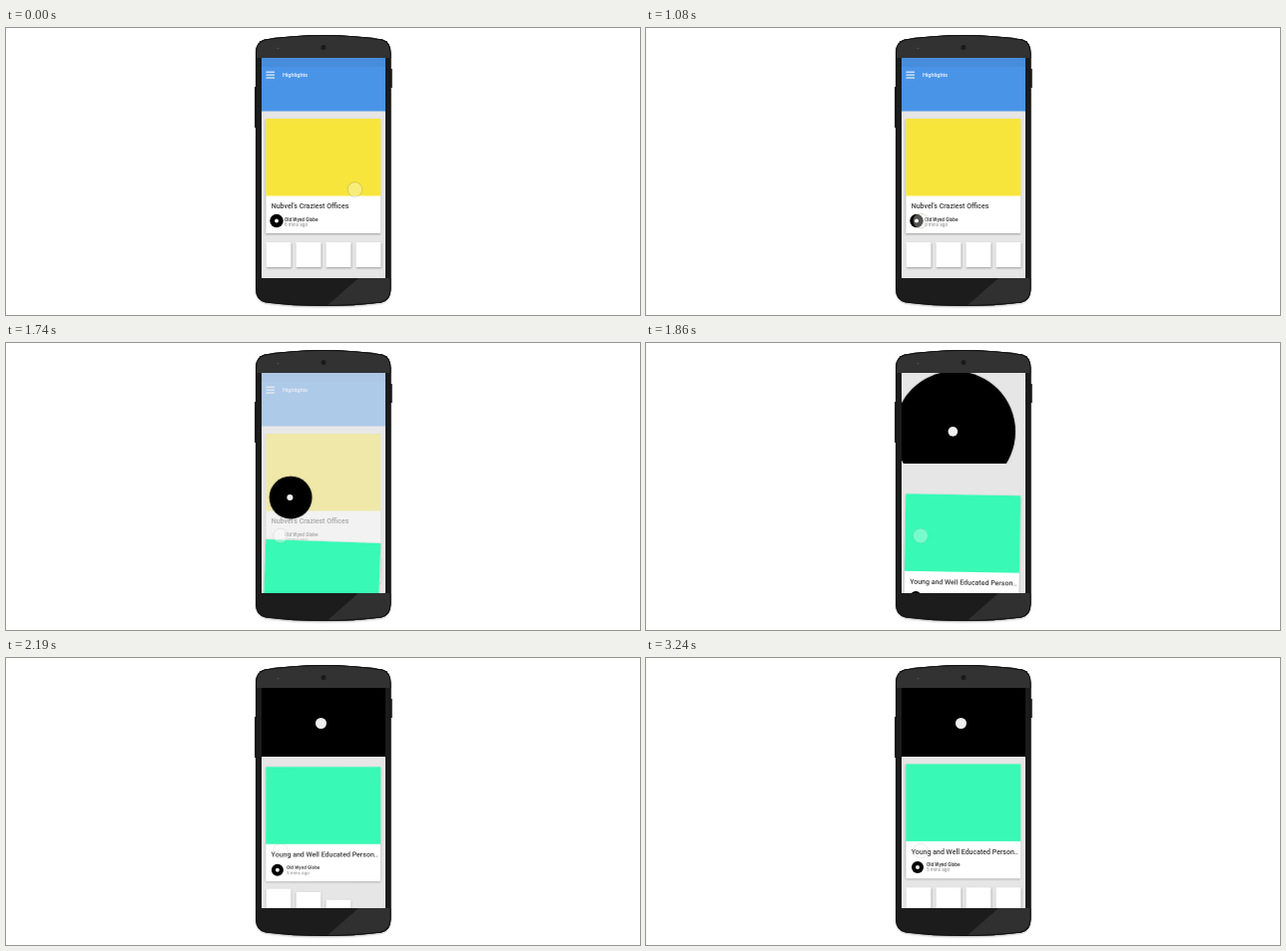
An HTML page with a canvas that plays this animation: 635x288 px, repeating every 3.39 s.

```html
<!DOCTYPE html>
<html lang="en">
<head>
<meta charset="utf-8">
<title>Card transition</title>
<style>
  html, body { margin: 0; width: 100%; height: 100%; overflow: hidden; background: #fff; }
  canvas { display: block; width: 635px; height: 288px; }
</style>
</head>
<body>
<canvas id="stage"></canvas>
<script>
const W = 635, H = 288, LOOP = 3390, STEP = 30;
const OPEN = 1620, FLIGHT = 330;
const GREY = '#e6e6e6', BLUE = '#4a94e7', YELLOW = '#f7e53c', GREEN = '#38f9b6';
const SCREEN = [256, 30, 124, 221];

const canvas = document.getElementById('stage');
const ctx = canvas.getContext('2d');
const dpr = window.devicePixelRatio || 1;
canvas.width = W * dpr;
canvas.height = H * dpr;

const clamp = v => Math.min(1, Math.max(0, v));
const span = (t, from, length) => clamp((t - from) / length);
const mix = (a, b, k) => a + (b - a) * k;
const smooth = k => k * k * (3 - 2 * k);

// Remaining share of the upward slide: 1 at the start, settling to 0
const slide = t => Math.exp(-Math.pow(Math.max(0, t - OPEN) / 225, 1.46));

function rect(x, y, w, h, fill) {
  ctx.fillStyle = fill;
  ctx.fillRect(x, y, w, h);
}

function disc(x, y, r, fill) {
  ctx.beginPath();
  ctx.arc(x, y, r, 0, Math.PI * 2);
  ctx.fillStyle = fill;
  ctx.fill();
}

function label(str, x, y, size, fill, weight = 500) {
  ctx.font = `${weight} ${size}px Roboto, sans-serif`;
  ctx.fillStyle = fill;
  ctx.fillText(str, x, y);
}

function shadow(alpha, blur, drop) {
  ctx.shadowColor = `rgba(0,0,0,${alpha})`;
  ctx.shadowBlur = blur * dpr;
  ctx.shadowOffsetY = drop * dpr;
}

function paper(x, y, w, h) {
  ctx.save();
  shadow(.32, 2, .7);
  rect(x, y, w, h, '#fff');
  ctx.restore();
}

function tile(i, y) {
  paper(260.5 + 30 * i, y, 25, 25);
}

function avatar(x, y, r) {
  disc(x, y, r, '#000');
  disc(x, y, 2, '#eee');
}

function card(y, color, title, age, textX) {
  paper(260.3, y, 115, 115);
  rect(260.3, y, 115, 77.5, color);
  label(title, 265.7, y + 90.2, 7, '#3a3a3a');
  label('Old Wynd Globe', textX, y + 102.6, 4.7, '#444', 700);
  label(age + ' mins ago', textX, y + 108, 4.7, '#8a8a8a', 400);
}

function highlights(t) {
  rect(256, 30, 124, 53.5, BLUE);
  rect(256, 30, 124, 9, '#488ddc');
  for (let i = 0; i < 3; i++) rect(260.5, 43.6 + 2.9 * i, 8.5, 1.2, '#e9f2fc');
  label('Highlights', 277, 49, 5.5, '#f4f9ff');
  card(91, YELLOW, "Nubvel's Craziest Offices", 6, 279);
  if (t < OPEN) avatar(271, 193.5, 6.7);
  for (let i = 0; i < 4; i++) tile(i, 215);
}

function tilted(deg, y, paint) {
  ctx.save();
  ctx.translate(262, y);
  ctx.rotate(deg * Math.PI / 180);
  ctx.translate(-262, -y);
  paint();
  ctx.restore();
}

function article(t) {
  for (let i = 0; i < 4; i++) {
    const rest = slide(t - 120 * i), y = 230.2 + 68 * rest;
    tilted(3 * rest, y, () => tile(i, y));
  }
  const rest = slide(t), y = 106.4 + 135 * rest;
  tilted(3 * rest, y, () => {
    card(y, GREEN, 'Young and Well Educated Person..', 5, 281);
    avatar(272, y + 103.5, 6);
  });
}

// The avatar grows into the header while its mark flies along.
function header(t) {
  const k = smooth(span(t, OPEN, FLIGHT));
  const y = mix(193.5, 65.5, k);
  ctx.save();
  ctx.beginPath();
  ctx.rect(256, 30, 124, mix(190, 69, k));
  ctx.clip();
  shadow(.3, 2, 0);
  disc(mix(271, 318, k), y, 6.7 + 70 * Math.pow(k, 1.3), '#000');
  ctx.restore();
  disc(mix(271, 315.5, k), y, mix(2, 5.5, k), '#eee');
}

function touch(t) {
  const across = span(t, 60, 540), down = span(t, 600, 480);
  const x = 349.5 - 63.5 * Math.pow(across, .85) - 11 * down * down;
  const y = 162 - 6 * across - 4 * Math.sin(Math.PI * across) + 37.5 * down;
  const glow = mix(.32, .06, span(t, 1980, 180));
  disc(x, y, 7.3, `rgba(255,255,255,${glow})`);
  ctx.strokeStyle = t < OPEN ? 'rgba(130,120,70,.4)' : 'rgba(150,150,150,.28)';
  ctx.lineWidth = .7;
  ctx.stroke();
}

const body = new Path2D('M250 25 Q250 14 259 11.5 Q287 7 318 7 Q349 7 377 11.5 Q385.5 14 385.5 25 V262 Q385.5 273 376 275.5 Q349 279 318 279 Q287 279 260 275.5 Q250 273 250 262 Z');

function phone() {
  ctx.save();
  shadow(.25, 2, 1.2);
  ctx.fillStyle = '#1c1c1c';
  ctx.fill(body);
  ctx.restore();
  rect(249, 59, 1.5, 41, '#222');
  rect(385, 41, 1.8, 19, '#222');

  ctx.save();
  ctx.clip(body);
  rect(250, 7, 136, 23, '#323232');
  // Diagonal gloss under the screen
  ctx.beginPath();
  ctx.moveTo(320, 280);
  ctx.lineTo(353, 251);
  ctx.lineTo(386, 251);
  ctx.lineTo(386, 280);
  ctx.fillStyle = '#303030';
  ctx.fill();
  ctx.strokeStyle = '#111';
  ctx.lineWidth = 2;
  ctx.stroke(body);
  ctx.restore();

  disc(318, 19.5, 2.5, '#1a1a1a');
  disc(272.5, 20.5, .8, '#555');
}

function draw(t) {
  ctx.setTransform(dpr, 0, 0, dpr, 0, 0);
  rect(0, 0, W, H, '#fff');
  phone();
  ctx.save();
  ctx.beginPath();
  ctx.rect(...SCREEN);
  ctx.clip();
  rect(...SCREEN, GREY);
  const cover = span(t, 1590, 240);
  if (cover < 1) {
    highlights(t);
    ctx.globalAlpha = cover;
    rect(...SCREEN, '#eaeaea');
    ctx.globalAlpha = 1;
  }
  if (t >= OPEN) {
    article(t);
    header(t);
  }
  touch(t);
  ctx.restore();
}

const start = performance.now();
function tick() {
  const t = (performance.now() - start) % LOOP;
  draw(Math.floor(t / STEP) * STEP);
  requestAnimationFrame(tick);
}
tick();
</script>
</body>
</html>
```
